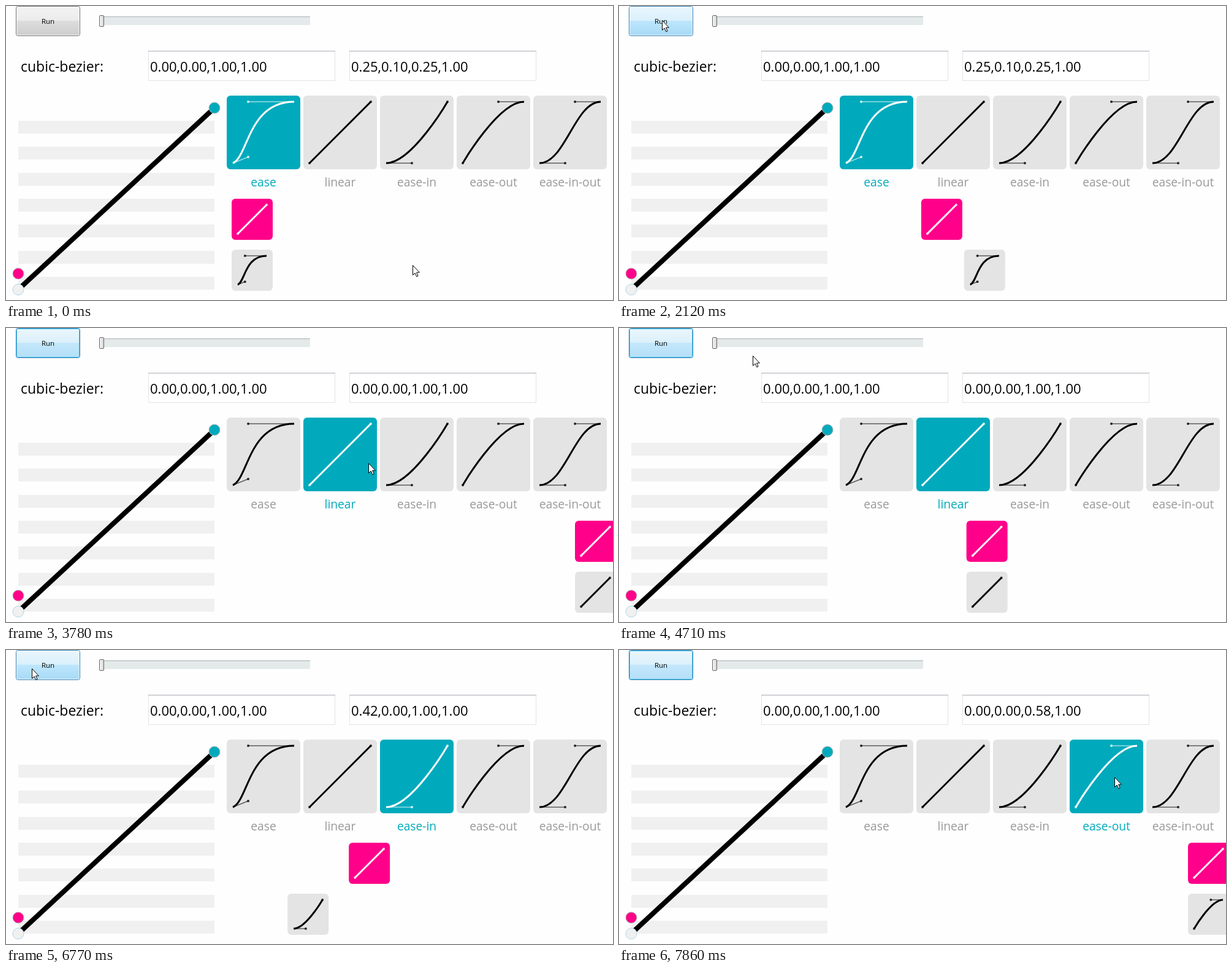
Recreate the animation shown at these times as an HTML page. Size 990 by 479 pixels, loop 8 s.

```html
<!DOCTYPE html>
<html lang="en">
<head>
<meta charset="utf-8">
<title>Cubic Bezier easing</title>
<style>
  html, body { margin: 0; width: 100%; height: 100%; overflow: hidden; background: #fefefe; }
  svg { display: block; width: 100%; height: 100%; }
  text { font-family: "Open Sans", "Noto Sans", sans-serif; }
</style>
</head>
<body>
<svg id="stage" viewBox="0 0 990 479">
  <defs>
    <linearGradient id="normal" x2="0" y2="1">
      <stop offset="0" stop-color="#f3f3f3"/><stop offset=".5" stop-color="#ebebeb"/>
      <stop offset=".5" stop-color="#dddddd"/><stop offset="1" stop-color="#cdcdcd"/>
    </linearGradient>
    <linearGradient id="hover" x2="0" y2="1">
      <stop offset="0" stop-color="#eaf6fd"/><stop offset=".5" stop-color="#d9f0fc"/>
      <stop offset=".5" stop-color="#bee6fd"/><stop offset="1" stop-color="#a7d9f5"/>
    </linearGradient>
    <linearGradient id="focus" x2="0" y2="1">
      <stop offset="0" stop-color="#ebf6fc"/><stop offset=".5" stop-color="#dbf0fb"/>
      <stop offset=".5" stop-color="#c4e7fb"/><stop offset="1" stop-color="#b3dff7"/>
    </linearGradient>
    <linearGradient id="knob" x2="1" y2="0">
      <stop offset="0" stop-color="#fafafa"/><stop offset="1" stop-color="#d2d2d2"/>
    </linearGradient>
  </defs>
</svg>
<script>
const LOOP = 8000, RUN_TIME = 964;
const TEAL = '#00aabc', PINK = '#ff008a', GREY = '#e4e4e4';
const stage = document.getElementById('stage');

const curves = [
  { name: 'ease', p: [.25, .1, .25, 1] },
  { name: 'linear', p: [0, 0, 1, 1] },
  { name: 'ease-in', p: [.42, 0, 1, 1] },
  { name: 'ease-out', p: [0, 0, .58, 1] },
  { name: 'ease-in-out', p: [.42, 0, .58, 1] }
];
const picks = [[0, 0], [3780, 1], [5680, 2], [7860, 3]];   // time, curve index
const runs = [1905, 4368, 6441];

// Screen refreshes: first, last, count
const bursts = [
  [0, 0, 1], [120, 390, 3], [1070, 2000, 8], [2120, 2690, 5], [2690, 3110, 4],
  [3260, 3500, 3], [3780, 4710, 8], [4830, 5370, 5], [5680, 6650, 7],
  [6770, 7430, 6], [7860, 7860, 1]
];

// Pointer tip: time, x, y
const pointer = [
  [0, 663, 422], [120, 760, 440], [255, 930, 468], [390, 1100, 560],
  [1069, 1100, 560], [1070, 522, 300], [1336, 290, 130], [1734, 70, 23], [2969, 70, 23],
  [3110, 92, 30], [3260, 230, 88], [3380, 470, 180], [3500, 591, 220], [3913, 591, 220],
  [4311, 70, 25], [4444, 70, 25], [4710, 218, 45], [5370, 667, 200], [5841, 667, 200],
  [6326, 42, 30], [6770, 42, 30], [7430, 808, 207], [8000, 808, 207]
];

function add(tag, attrs, parent = stage, content = '') {
  const el = document.createElementNS('http://www.w3.org/2000/svg', tag);
  set(el, attrs);
  el.textContent = content;
  return parent.appendChild(el);
}
function set(el, attrs) {
  for (const k in attrs) el.setAttribute(k, attrs[k]);
}
const rect = (x, y, width, height, attrs, parent) =>
  add('rect', { x, y, width, height, ...attrs }, parent);
const circle = (cx, cy, r, attrs, parent) => add('circle', { cx, cy, r, ...attrs }, parent);
const label = (x, y, size, content, attrs) =>
  add('text', { x, y, 'font-size': size, ...attrs }, stage, content);
const format = p => p.map(v => v.toFixed(2)).join(',');

// A rounded square showing a timing curve with its control handles
function makeTile(size, x, y, width) {
  const g = add('g', { transform: `translate(${x} ${y})` });
  const box = rect(0, 0, size, size, { rx: 6 }, g);
  const handles = add('path', { fill: 'none', stroke: 'currentColor', 'stroke-width': 1.5, opacity: .6 }, g);
  const line = add('path', { fill: 'none', stroke: 'currentColor', 'stroke-width': width }, g);
  const dots = [0, 1].map(() => circle(0, 0, 2, { fill: 'currentColor', opacity: .8 }, g));
  const span = size - 20;
  return {
    paint(fill, color) {
      set(box, { fill });
      set(g, { color });
    },
    shape([a, b, c, d]) {
      const at = (u, v) => [10 + u * span, 10 + (1 - v) * span];
      const [from, p, q, to] = [at(0, 0), at(a, b), at(c, d), at(1, 1)];
      set(line, { d: `M${from}C${p} ${q} ${to}` });
      set(handles, { d: `M${from}L${p}M${to}L${q}` });
      [p, q].forEach(([cx, cy], i) => set(dots[i], { cx, cy }));
    },
    move(left) { set(g, { transform: `translate(${left} ${y})` }); }
  };
}

function makeField(x) {
  rect(x + .5, 73.5, 304, 48, { fill: '#fff', stroke: '#e2e3ea' });
  add('path', { d: `M${x} 73.5h305`, stroke: '#abadb3' });
  return label(x + 3, 107, 22, '', {});
}

// Button and slider
const face = rect(16.5, .5, 104, 48, { rx: 3 });
const rim = rect(17.5, 1.5, 102, 46, { rx: 2, fill: 'none' });
label(68.5, 29, 11.5, 'Run', { 'text-anchor': 'middle' });
rect(152, 17, 344, 14, { fill: '#e4e9ea' });
add('path', { d: 'M152 17.5h344', stroke: '#a9b1b3' });
rect(152.5, 15.5, 7, 18, { rx: 1.5, fill: 'url(#knob)', stroke: '#686868' });

// Curve text
label(24, 107, 23, 'cubic-bezier:', {});
makeField(232).textContent = format(curves[1].p);
const chosen = makeField(560);

// Editor
for (let i = 0; i < 7; i++) {
  rect(20, Math.round(187 + i * 42.3), 320, 21, { fill: '#f0f0f0' });
}
add('path', { d: 'M20 462L340 166', stroke: '#000', 'stroke-width': 8 });
circle(20, 462, 9, { fill: '#f0f0f0', stroke: '#add8e6' });
circle(20, 436, 9, { fill: PINK, stroke: '#b4b4b4' });
circle(340, 166, 9, { fill: TEAL, stroke: '#b4b4b4' });

// Library and the two racers
const tiles = curves.map((curve, i) => {
  const tile = makeTile(120, 360 + 125 * i, 146, 3);
  tile.shape(curve.p);
  const caption = label(420 + 125 * i, 294, 19.2, curve.name, { 'text-anchor': 'middle' });
  return { tile, caption };
});
const steady = makeTile(67, 368, 314, 3);
steady.shape(curves[1].p);
steady.paint(PINK, '#fff');
const racer = makeTile(67, 368, 397, 3);
racer.paint(GREY, '#000');

const arrow = add('path', {
  d: 'M.5 .5V16.4L4.1 13L6.7 18.8L9.1 17.8L6.6 12.1H11.4Z',
  fill: '#fff', stroke: '#000', 'stroke-linejoin': 'round'
});

function bezier([a, b, c, d], x) {
  const value = (p, q, u) => 3 * p * u * (1 - u) ** 2 + 3 * q * u * u * (1 - u) + u ** 3;
  let low = 0, high = 1;
  for (let i = 0; i < 24; i++) {
    const mid = (low + high) / 2;
    if (value(a, c, mid) < x) low = mid; else high = mid;
  }
  return value(b, d, (low + high) / 2);
}

function refreshTime(t) {
  const [first, last, count] = bursts.findLast(b => b[0] <= t);
  if (count === 1) return first;
  const step = (last - first) / (count - 1);
  return first + step * Math.floor((Math.min(t, last) - first) / step + 1e-6);
}

function pointerAt(t) {
  const i = pointer.findLastIndex(k => k[0] <= t);
  const [t0, x0, y0] = pointer[i];
  const [t1, x1, y1] = pointer[Math.min(i + 1, pointer.length - 1)];
  const f = t1 > t0 ? (t - t0) / (t1 - t0) : 0;
  return [x0 + (x1 - x0) * f, y0 + (y1 - y0) * f];
}

const looks = {
  normal: ['#707070', '#f8f8f8'],
  hover: ['#3c7fb1', '#eefaff'],
  focus: ['#3c7fb1', '#45c4f0']
};
let selected = -1;

function select(index) {
  if (index === selected) return;
  selected = index;
  tiles.forEach(({ tile, caption }, i) => {
    const on = i === index;
    tile.paint(on ? TEAL : GREY, on ? '#fff' : '#000');
    set(caption, { fill: on ? TEAL : '#999' });
  });
  racer.shape(curves[index].p);
  chosen.textContent = format(curves[index].p);
}

function draw(now) {
  const t = refreshTime(now % LOOP);
  select(picks.findLast(p => p[0] <= t)[1]);

  const start = runs.findLast(r => r <= t);
  const progress = start === undefined ? 0 : Math.min(1, (t - start) / RUN_TIME);
  steady.move(368 + 560 * progress);
  racer.move(368 + 560 * bezier(curves[selected].p, progress));

  const [x, y] = pointerAt(t);
  set(arrow, { transform: `translate(${Math.round(x)} ${Math.round(y)})` });
  const inside = x >= 16 && x < 121 && y < 49;
  const state = inside ? 'hover' : start === undefined ? 'normal' : 'focus';
  set(face, { fill: `url(#${state})`, stroke: looks[state][0] });
  set(rim, { stroke: looks[state][1] });
}

const origin = performance.now();
function tick() {
  draw(performance.now() - origin);
  requestAnimationFrame(tick);
}
tick();
</script>
</body>
</html>
```
